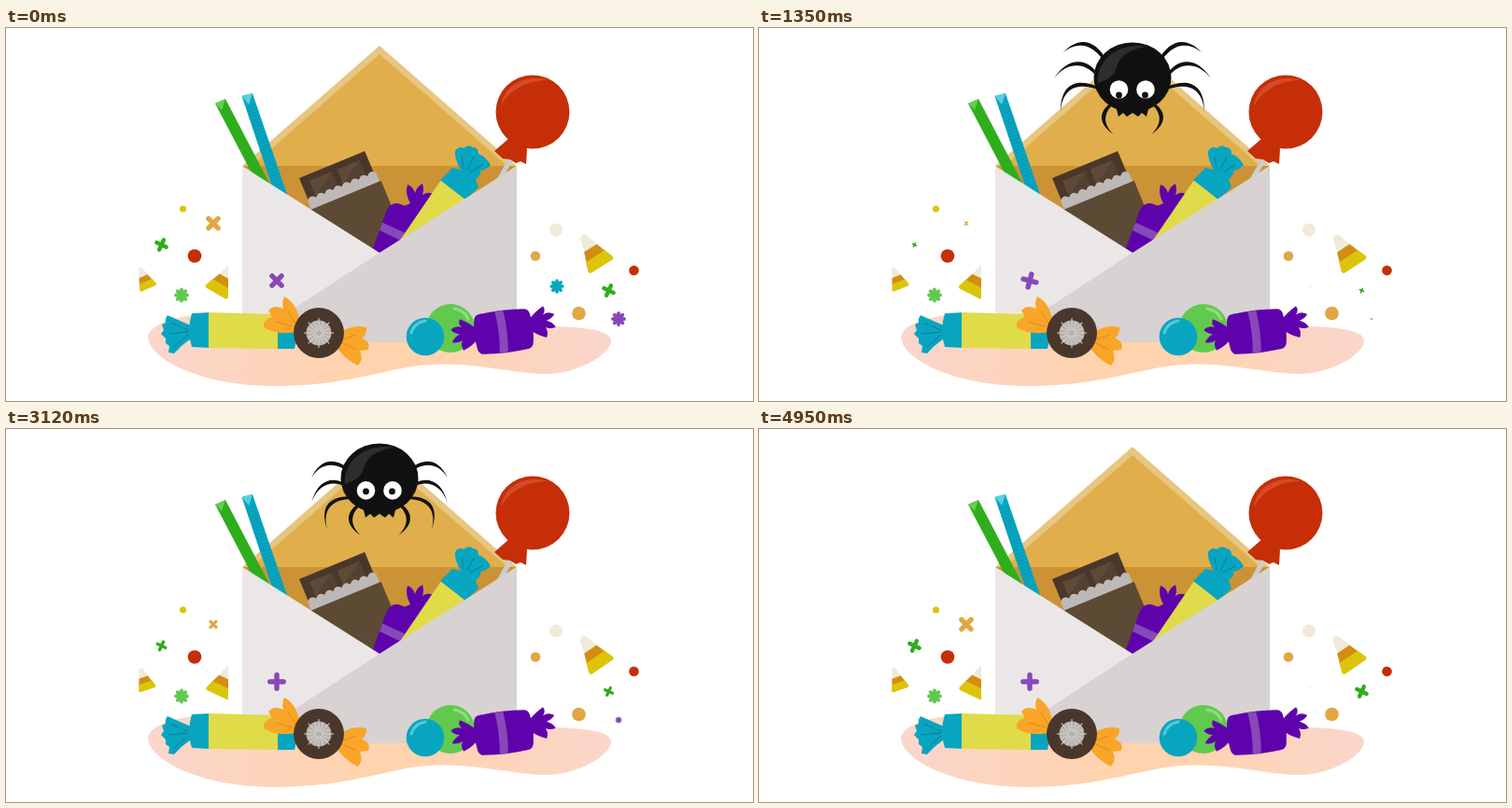
Write an HTML page that moves like this. It is 800 by 400 pixels and loops after 4980 ms.

```html
<!DOCTYPE html>
<html lang="en">
<head>
<meta charset="utf-8">
<title>Envelope of treats</title>
<style>
  html, body { margin: 0; width: 100%; height: 100%; overflow: hidden; background: #fff; }
  svg { display: block; width: 100vw; height: 100vh; }
</style>
</head>
<body>
<svg viewBox="0 0 800 400">
  <defs>
    <linearGradient id="ground">
      <stop offset="0" stop-color="#fad6cc"/>
      <stop offset=".45" stop-color="#ffd3ad"/>
      <stop offset=".6" stop-color="#ffd3ad"/>
      <stop offset="1" stop-color="#fad6cc"/>
    </linearGradient>
    <clipPath id="leftEdge"><path d="M142 180H238V300H142Z"/></clipPath>
    <g id="corn">
      <path d="M-4 -18Q0 -23 4 -18L9 -2H-8Z" fill="#f0ebd8"/>
      <path d="M-8 -4H8L12 7H-12Z" fill="#d38e12"/>
      <path d="M-12 6H12L15.500 16Q15.500 19 13 19H-13Q-15.500 19 -15.500 16Z" fill="#dcc40b"/>
    </g>
    <path id="cross" d="M-7.2 0H7.2M0 -7.2V7.2" fill="none" stroke-width="5.4" stroke-linecap="round"/>
    <path id="burst" d="M-6 0H6M0 -6V6M-4.3 -4.3L4.3 4.3M-4.3 4.3L4.3 -4.3" fill="none" stroke-width="3.8" stroke-linecap="round"/>
    <path id="fan" d="M3 -4Q-4 -12 -15 -18Q-18 -14 -14 -9Q-20 -12 -26 -8Q-24 -4 -17 -2Q-24 1 -26 6Q-20 8 -15 5Q-18 10 -15 16Q-4 12 3 4Z"/>
  </defs>

  <path fill="url(#ground)" d="M152 332C153 318 180 307 230 306L400 318C480 330 530 319 585 320C625 321 649 325 648 336C646 352 610 372 574 371C540 370 500 358 455 361C410 363 370 384 288 384C210 384 154 356 152 332Z"/>

  <!-- envelope back -->
  <path fill="#e8c581" d="M400 19L547 148H253Z"/>
  <path fill="#e0af4c" d="M400 28L537 148H263Z"/>
  <path fill="#cc9336" d="M253 148H547L400 242Z"/>

  <g id="spider">
    <g id="legs" fill="#111"></g>
    <ellipse rx="41.500" ry="37.500" fill="#111"/>
    <path fill="#2d2e2c" d="M-37 6C-39 -22 -10 -38 15 -33C-5 -30 -14 -22 -17 -11C-20 1 -30 3 -37 6Z"/>
    <path fill="#111" d="M-18 30L-15 42L-10 38L-6 42L0 38L6 42L10 38L15 42L18 30Z"/>
    <g fill="#fff"><circle cx="-14.500" cy="13" r="9.800"/><circle cx="14" cy="13" r="9.800"/></g>
    <g id="pupils" fill="#111"><circle cx="-14.500" r="3.400"/><circle cx="13.500" r="3.400"/></g>
  </g>

  <!-- straws -->
  <path fill="#2fae1d" d="M224 81L235 76L283 168L268 165Z"/>
  <path fill="#62cf50" d="M224 81L235 76L231 88Z"/>
  <path fill="#08a5c0" d="M252.500 73L264 70L302 181L287 176Z"/>
  <path fill="#58cfe0" d="M252.500 73L264 70L260 82Z"/>
  <path fill="none" stroke="#000" stroke-opacity=".08" stroke-width="10" stroke-dasharray="1.200 2.500" d="M262 84L294 176"/>

  <!-- chocolate bar -->
  <g transform="translate(314 161) rotate(-22.5)">
    <path fill="#4a372b" d="M0 0H76V34H0Z"/>
    <path fill="#5e4a36" d="M9 7H35V24H9ZM41 7H67V24H41Z"/>
    <path fill="#463329" d="M9 24L35 7V24ZM41 24L67 7V24Z" opacity=".35"/>
    <path id="foil" fill="#bdb9b7"/>
    <path fill="#5d4a35" d="M-2 36H80V115H-2Z"/>
  </g>

  <!-- candies inside -->
  <g fill="#5e03ab">
    <path d="M391 242L407 197Q411 187 420 188L436 194Q446 198 442 206L415 250Z"/>
    <path d="M424 192L433 188Q427 177 430 168Q436 170 438 177Q440 170 446 167Q448 173 446 179Q452 175 457 178Q456 184 449 187Q455 189 455 193L441 199Z"/>
    <path fill="#8749b8" d="M403 208.500L427 219.500L423 228L400 217Z"/>
  </g>
  <path fill="#e0db49" d="M466 163L492 184L440 250L410 245Z"/>
  <path fill="#08a5c0" d="M465 163L478 150L487 152Q480 140 481 132Q485 126 490 129Q496 124 500 128Q506 128 506 135Q514 138 519 147Q515 152 508 153Q509 158 503 162L506 171L492 184Z"/>
  <path fill="none" stroke="#087f94" d="M490 151L488 138M494 152L501 138M497 154L512 146"/>

  <!-- lollipop -->
  <path stroke="#c8ced0" stroke-width="5" d="M542 138L528 163"/>
  <circle cx="564" cy="90" r="39.500" fill="#c52e07"/>
  <path fill="#c52e07" d="M523 132L539 118L553 122L558 130L557 146L551 143L546 145L540 141L532 140Z"/>
  <path fill="#d54b25" d="M530 84C533 61 556 49 580 56C560 56 540 65 530 84Z"/>

  <!-- envelope front -->
  <path fill="#ebe7e7" d="M253 148L400 241V337H253Z"/>
  <path fill="#d8d2d2" d="M547 148V337H253L400 241Z"/>

  <!-- long yellow candy -->
  <g fill="#08a5c0">
    <path d="M198 319Q184 313 173 308Q170 312 171 316L167 318L169 324L166 328L171 333L171 338L175 341L174 348L180 349Q188 340 198 333Z"/>
    <path d="M199 306L219 305V343L199 342Q193 325 199 306ZM288 306H309Q314 325 309 344H288Z"/>
    <path fill="#e0db49" d="M217 305L291 307V344L217 343Z"/>
    <path fill="none" stroke="#087f94" d="M195 324L176 316M195 326L174 328M195 329L180 342"/>
  </g>

  <!-- chocolate swirl -->
  <g fill="#f8a528">
    <path d="M315 317Q312 295 298 288Q295 294 297 301Q287 296 281 303L285 310Q275 312 276 321Q293 331 314 325Z"/>
    <path d="M355 328Q371 317 386 321Q387 327 381 333Q391 336 388 345L379 346Q383 355 377 362Q360 354 352 338Z"/>
    <path fill="none" stroke="#df891a" d="M310 317L302 304M307 320L289 315M361 334L375 329M361 338L375 345"/>
  </g>
  <circle cx="335" cy="327" r="27" fill="#4a372b"/>
  <circle cx="335" cy="327" r="13.500" fill="#b8b1ad"/>
  <g id="spokes" stroke="#d8d3cf" transform="translate(335 327)"></g>

  <!-- balls and purple candy -->
  <circle cx="476" cy="322" r="26" fill="#62c94f"/>
  <path fill="none" stroke="#92dc82" stroke-width="3" stroke-linecap="round" d="M480 301Q491 303 495 312"/>
  <circle cx="449" cy="331" r="20.300" fill="#08a5c0"/>
  <path fill="none" stroke="#53cadc" stroke-width="3" stroke-linecap="round" d="M434 327Q437 316 449 314"/>
  <g fill="#5e03ab" transform="translate(533 325.500) rotate(-7)">
    <use href="#fan" x="-30" y="-1"/>
    <use href="#fan" x="-30" y="-4" transform="scale(-1 1)"/>
    <path d="M-24 -21.500Q0 -24 24 -21.500Q29 -21 30 -16Q33 0 30 16Q29 21 24 21.500Q0 24 -24 21.500Q-29 21 -30 16Q-33 0 -30 -16Q-29 -21 -24 -21.500Z"/>
    <path fill="#8749b8" d="M-7 -22.500H2Q5 0 2 22.500H-7Q-4 0 -7 -22.500Z"/>
  </g>

  <!-- confetti -->
  <circle cx="189.500" cy="194" r="3.600" fill="#dcc40b"/>
  <circle cx="202" cy="244.500" r="7.300" fill="#c52e07"/>
  <circle cx="567" cy="244.500" r="5.300" fill="#e0a744"/>
  <circle cx="672.500" cy="260" r="5.300" fill="#c52e07"/>
  <circle cx="613.500" cy="306" r="7.300" fill="#e0a744"/>
  <circle id="cream" cx="589" cy="216.500" r="7" fill="#f0ebd8"/>
  <g clip-path="url(#leftEdge)">
    <use id="cornA" href="#corn"/>
    <use id="cornB" href="#corn"/>
  </g>
  <use id="cornC" href="#corn"/>
  <use id="orangeX" href="#cross" stroke="#e0a744"/>
  <use id="greenX" href="#cross" stroke="#2fae1d"/>
  <use id="greenX2" href="#cross" stroke="#2fae1d"/>
  <use id="purpleX" href="#cross" stroke="#8749b8"/>
  <use id="greenBurst" href="#burst" stroke="#62c94f"/>
  <use id="blueBurst" href="#burst" stroke="#08a5c0"/>
  <use id="purpleBurst" href="#burst" stroke="#8749b8"/>
</svg>
<script>
const LOOP = 4980;
const $ = id => document.getElementById(id);

// Smooth interpolation through flat [time, value, time, value, ...] keys
function keys(t, k) {
  if (t <= k[0]) return k[1];
  for (let i = 2; i < k.length; i += 2) {
    if (t < k[i]) {
      const p = (t - k[i - 2]) / (k[i] - k[i - 2]);
      return k[i - 1] + (k[i + 1] - k[i - 1]) * (1 - Math.cos(Math.PI * p)) / 2;
    }
  }
  return k[k.length - 1];
}

const BEATS = [0, 420, 1350, 1950, 3120, 3810, 4950];
const beat = (t, ...values) => keys(t, BEATS.flatMap((b, i) => [b, values[i]]));

function place(id, x, y, scale = 1, angle = 0) {
  $(id).setAttribute('transform', `translate(${x} ${y}) rotate(${angle}) scale(${Math.max(scale, 0)})`);
}

// Tapered leg from base b over controls c and d to tip e
function leg(bx, by, cx, cy, dx, dy, ex, ey) {
  const len = Math.hypot(ex - bx, ey - by);
  const nx = (by - ey) / len * 2.4, ny = (ex - bx) / len * 2.4;
  return `<path d="M${bx + nx} ${by + ny}C${cx + nx} ${cy + ny} ${dx + nx} ${dy + ny} ${ex} ${ey}`
    + `C${dx - nx} ${dy - ny} ${cx - nx} ${cy - ny} ${bx - nx} ${by - ny}Z"/>`;
}

const outer = leg(-28, -16, -40, -38, -58, -43, -75, -26)
  + leg(-36, 1, -46, -18, -68, -22, -84, 1)
  + leg(-36, 12, -52, 5, -76, 3, -77, 37);
const side = `<g class="swing">${outer}</g><g class="front">${leg(-20, 27, -34, 36, -35, 50, -20, 61)}</g>`;
$('legs').innerHTML = `<g>${side}</g><g transform="scale(-1 1)">${side}</g>`;
const swings = document.querySelectorAll('.swing');
const fronts = document.querySelectorAll('.front');

$('foil').setAttribute('d', 'M-1 26' + 'q4.950 -6 9.900 0'.repeat(8) + 'V37H-1Z');
$('spokes').innerHTML = Array.from({ length: 16 }, (_, i) =>
  `<path d="M3 0H${i % 2 ? 13 : 16}" transform="rotate(${i * 22.5})"/>`).join('');

function draw(t) {
  const y = keys(t, [0, -85, 390, 68, 430, 67, 760, 50, 1050, 53, 3110, 53, 3240, 48, 3600, -120]);
  place('spider', 400, y);
  $('spider').style.display = t > 3600 ? 'none' : '';
  $('pupils').setAttribute('transform', `translate(0 ${keys(t, [2200, 19, 2500, 14])})`);

  const tuck = keys(t, [420, 0, 700, -.06, 1000, .04, 1350, 0, 1700, -.06, 1950, .05, 2160, 0, 2730, 0, 3060, 1]);
  const splay = keys(t, [420, 8, 800, 0]);
  for (const s of swings) s.setAttribute('transform', `rotate(${-19 * tuck}) scale(${1 - .08 * tuck})`);
  for (const f of fronts) f.setAttribute('transform', `rotate(${splay})`);

  const rock = beat(t, 0, 2, 3, 4, 5, 1, 5);
  place('cornA', 148, 268.5, .62, -24 + rock);
  place('cornB', 233, 270, .88, 30 - rock);
  place('cornC', 628, 239.5, 1, -32 - rock / 2);

  place('orangeX', 222, 209.5, beat(t, 1, .2, .3, .85, .6, .85, 1), 45);
  place('greenX', 166.5, 232.5, beat(t, .8, .4, .3, .48, .65, .18, .8), 25);
  place('greenX2', 645.5, 281.5, beat(t, .8, .4, .32, .45, .6, .22, .8), 25);
  place('purpleX', 290, 271, 1, beat(t, 45, 62, 105, 180, 270, 315, 360));

  place('greenBurst', 188, 286.5);
  $('greenBurst').style.opacity = beat(t, 1, .1, 1, .15, 1, .35, 1);
  $('cream').style.opacity = beat(t, 1, 0, 1, .1, 1, .22, 1);

  place('blueBurst', 590, 277, (1 - Math.cos(2 * Math.PI * (t - 400) / 900)) / 2);
  place('purpleBurst', 656, 312, keys(t, [0, 1, 420, 0, 880, 1, 1330, .1, 1850, 1, 2300, 0,
    2800, 1, 3120, .45, 3300, 0, 3700, 1, 4100, 0, 4500, 1, 4930, 0]));
}

const start = performance.now();
function tick() {
  draw((performance.now() - start) % LOOP);
  requestAnimationFrame(tick);
}
tick();
</script>
</body>
</html>
```
